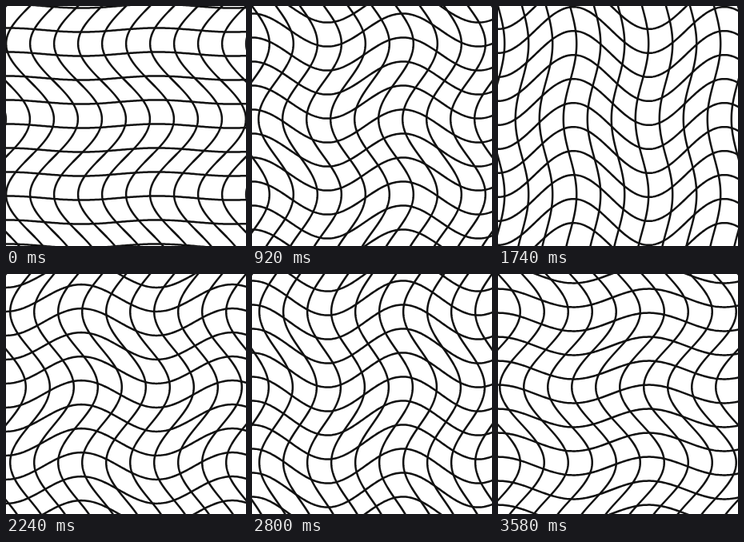
An HTML page with a canvas that plays this animation: 300 px wide and 300 px high, repeating every 3600 ms.

```html
<!DOCTYPE html>
<html lang="en">
<head>
<meta charset="utf-8">
<title>Waving grid</title>
<style>
  html, body { margin: 0; width: 100%; height: 100%; overflow: hidden; background: #fff; }
  canvas { display: block; }
</style>
</head>
<body>
<canvas id="stage" width="300" height="300"></canvas>
<script>
  const SIZE = 300, CELL = 30, SWAY = 30;
  const LOOP = 3600, STEP = 20, TURN = 0.05, START = 0.085;
  const ctx = document.getElementById('stage').getContext('2d');

  // Strokes one family of parallel curves; place(along, across) gives the point.
  function strokeFamily(offset, place) {
    ctx.beginPath();
    for (let base = -2 * CELL; base <= SIZE + 2 * CELL; base += CELL) {
      for (let s = -4; s <= SIZE + 4; s += 2) {
        const [x, y] = place(s, base + offset(s / CELL));
        if (s === -4) ctx.moveTo(x, y);
        else ctx.lineTo(x, y);
      }
    }
    ctx.stroke();
  }

  function draw(time) {
    const angle = START + TURN * Math.floor((time % LOOP) / STEP);
    const swayX = -SWAY * Math.cos(angle);
    const swayY = -SWAY * Math.sin(angle);

    ctx.fillStyle = '#fff';
    ctx.fillRect(0, 0, SIZE, SIZE);
    ctx.strokeStyle = '#111';
    ctx.lineWidth = 2.5;
    ctx.lineJoin = 'round';
    strokeFamily(u => swayX * Math.sin(u), (s, c) => [c, s]);
    strokeFamily(u => swayY * Math.cos(u), (s, c) => [s, c]);
  }

  const begin = performance.now();
  function tick() {
    draw(performance.now() - begin);
    requestAnimationFrame(tick);
  }
  tick();
</script>
</body>
</html>
```
